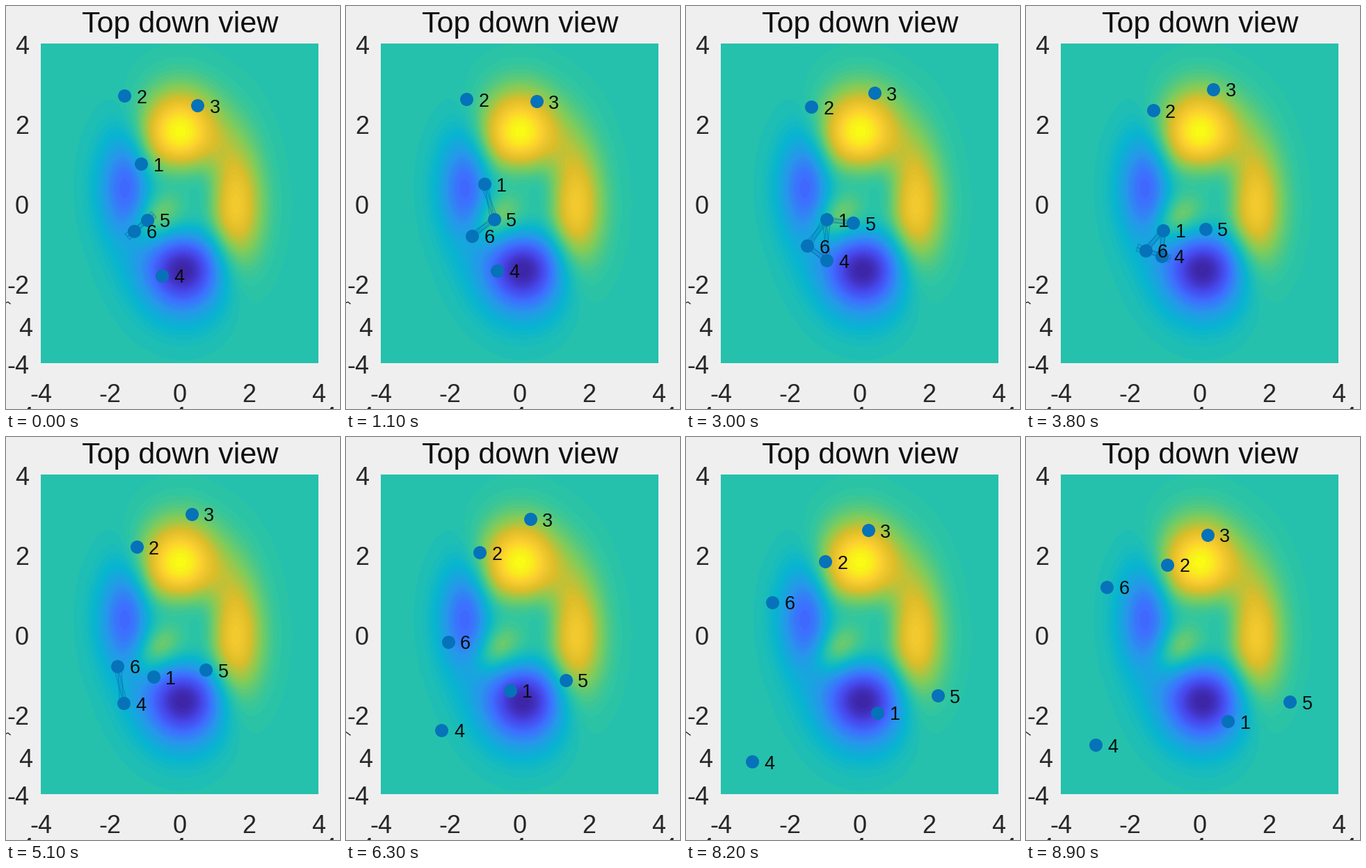
A matplotlib script that plays this animation: 480x580 px, repeating every 9 s.

```python
from itertools import combinations

import matplotlib.pyplot as plt
import numpy as np
from matplotlib.animation import FuncAnimation
from matplotlib.collections import PolyCollection
from matplotlib.colors import LinearSegmentedColormap

W, H, DPI = 480, 580, 100
FRAMES, STEP = 90, 100
LEFT, RIGHT, TOP, BOTTOM = 50, 449, 54, 514
X0, Y0 = (LEFT + RIGHT) / 2, (TOP + BOTTOM) / 2
SX, SY = (RIGHT - LEFT) / 8, (BOTTOM - TOP) / 8
LINK_RANGE = 1.03
DARK = "#262626"

PARULA = LinearSegmentedColormap.from_list(
    "parula", "#3e26a8 #4747eb #3e6fff #2797eb #08b5d0 "
              "#31c69f #81cc59 #dcbd29 #fccf30 #f9fb15".split(), N=64)

# Each agent moves straight between turns, {clock: x + yj}
MEET, AVOID = 0.22, 0.43
PATHS = [
    {0: 194 + 227j, MEET: 205.5 + 295j, AVOID: 194.5 + 331j, 1: 290 + 409j},
    {0: 170 + 129j, 1: 203 + 184j},
    {0: 275 + 143j, 0.55: 266.6 + 109.5j, 1: 260.5 + 140.5j},
    {0: 224 + 388j, AVOID: 191.5 + 356j, 0.88: 93 + 476j, 1: 100 + 443j},
    {0: 203 + 308j, MEET: 226 + 305j, 1: 379 + 381j},
    {0: 184 + 324j, AVOID: 170 + 355j, 1: 116 + 216j},
]


def bell(v, mid, width):
    return np.exp(-((v - mid) / width) ** 2 / 2)


def lobe(v, peak, power):
    """Power times Gaussian, equal to one at |v| = peak."""
    r = np.abs(v) / peak
    return r ** power * np.exp(power / 2 * (1 - r * r))


def field(x, y):
    north = 0.47 * lobe(y, 1.8, 3.5) * bell(x, 0.02, 0.79)
    south = -0.524 * lobe(y, 1.68, 3) * bell(x, 0.09, 0.82)
    east = 0.33 * lobe(x, 1.63, 5) * bell(y, -0.05, 1.12)
    west = -0.32 * lobe(x, 1.57, 5) * bell(y, 0.4, 0.98)
    dx, dy = x + 0.66, y + 0.36
    bump = 0.125 * bell(0.82 * dx + 0.57 * dy, 0, 0.57) \
        * bell(0.82 * dy - 0.57 * dx, 0, 0.33)
    return (0.524 + np.where(y > 0, north, south)
            + np.where(x > 0, east, west) + bump)


def positions(i):
    clock = (i / (FRAMES - 1)) ** 1.13
    z = np.array([np.interp(clock, list(p), list(p.values())) for p in PATHS])
    return np.column_stack([z.real, z.imag])


def arrow(a, b, length=50, half=5.5):
    """Slim arrowhead of fixed size centred between a and b."""
    d = (b - a) / np.hypot(*(b - a))
    n = np.array([-d[1], d[0]])
    mid = (a + b) / 2
    back = mid - d * length / 2
    return [back + n * half, mid + d * length / 2, back - n * half]


def links(pos):
    heads = []
    for a, b in combinations(pos, 2):
        if np.hypot(*((a - b) / (SX, SY))) < LINK_RANGE:
            heads += [arrow(a, b), arrow(b, a)]
    return heads


fig = plt.figure(figsize=(W / DPI, H / DPI), dpi=DPI, facecolor="#efefef")
ax = fig.add_axes([0, 0, 1, 1])


def label(x, y, s, px, ha="center", color=DARK, **kw):
    return ax.text(x, y + 0.35 * px, s, fontsize=px * 72 / DPI, ha=ha,
                   va="baseline", color=color, family="Liberation Sans", **kw)


cols = (np.arange(LEFT, RIGHT) + 0.5 - X0) / SX
rows = (Y0 - np.arange(TOP, BOTTOM) - 0.5) / SY
ax.imshow(field(*np.meshgrid(cols, rows)), cmap=PARULA, vmin=0, vmax=1,
          extent=(LEFT, RIGHT, BOTTOM, TOP), interpolation="nearest",
          aspect="auto")
ax.set_xlim(0, W)
ax.set_ylim(H, 0)
ax.axis("off")

label(250, 23, "Top down view", 43.2, color="#101010")
for v in range(-4, 5, 2):
    label(33, Y0 - v * SY + 2.5, str(v), 36, "right")
    label(X0 + v * SX, 557, str(v), 36)
# Neighbouring plot's labels showing at the borders
label(38.5, 462, "4", 36, "right")
for x in (30, 249, 465):
    label(x, 588, "4", 34)
mark, = ax.plot([], [], color=DARK, lw=1)

edges = PolyCollection([], facecolors=(0, 0.45, 0.74, 0.12),
                       edgecolors=(0, 0.35, 0.6, 0.45), linewidths=0.6,
                       zorder=3)
ax.add_collection(edges)
dots, = ax.plot([], [], "o", color="#0672b9", ms=19 * 72 / DPI, mew=0, zorder=4)
names = [label(0, 0, str(k), 27, "left", "#080c0c", zorder=5)
         for k in range(1, len(PATHS) + 1)]


def update(i):
    pos = positions(i)
    dots.set_data(*pos.T)
    edges.set_verts(links(pos))
    for name, (x, y) in zip(names, pos):
        name.set_position((x + 17.5, y + 10.5))
    if i * STEP < 5600:
        mark.set_data([0, 3, 6], [427, 426, 428.5])
    else:
        mark.set_data([0, 6], [424.5, 429])
    return [dots, edges, mark, *names]


anim = FuncAnimation(fig, update, frames=FRAMES, interval=STEP, repeat=True,
                     repeat_delay=0, blit=False)
plt.show()
```
